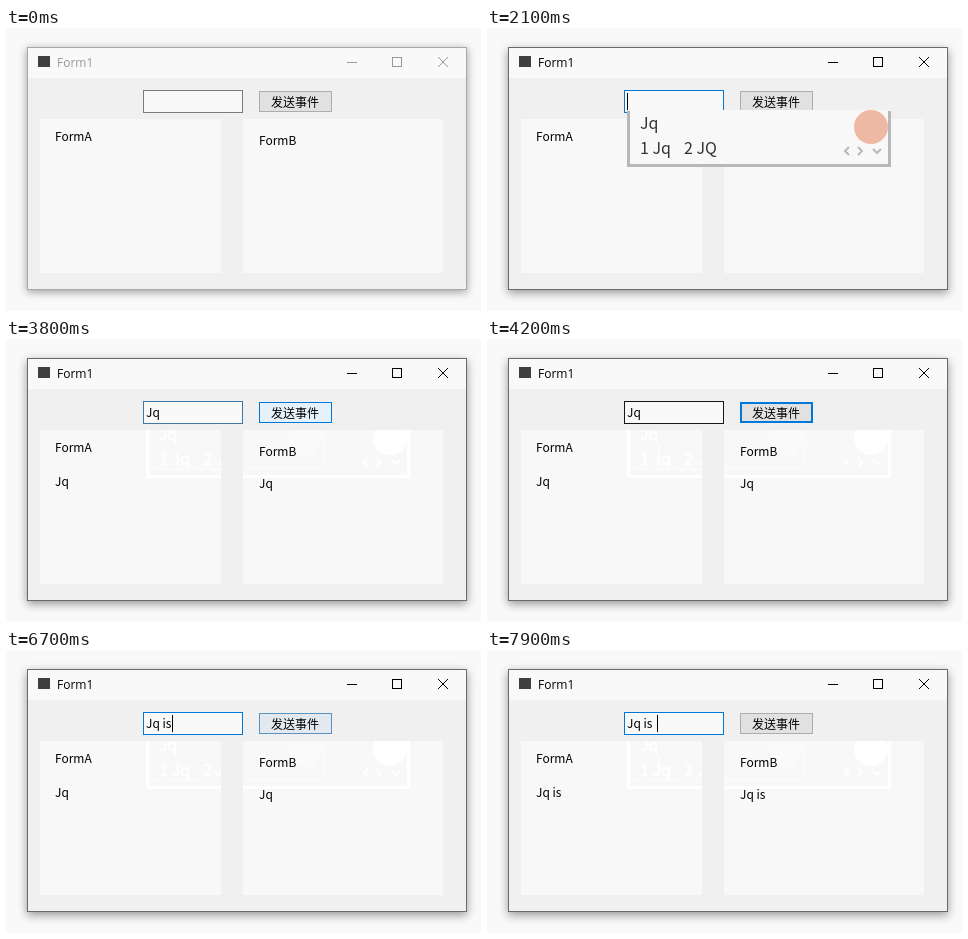
Recreate the animation shown at these times as an HTML page. Size 475 px wide and 283 px high, loop 8000 ms.

```html
<!DOCTYPE html>
<html lang="zh">
<head>
<meta charset="utf-8">
<title>Form1</title>
<style>
  html, body { margin: 0; width: 100%; height: 100%; overflow: hidden; background: #f9f9f9; }
  svg { display: block; width: 475px; height: 283px; font: 12px "Noto Sans CJK SC", "Noto Sans CJK", sans-serif; }
  text { white-space: pre; }
  rect, .crisp { shape-rendering: crispEdges; }
  .title { font-family: "Open Sans", sans-serif; }
  .big { font-size: 16px; }
  #window { filter: drop-shadow(0 2px 4px rgba(0, 0, 0, .38)); }
  #window.active { filter: drop-shadow(0 3px 5px rgba(0, 0, 0, .4)); }
  #popup { fill: #333; stroke: none; }
  #ghost { fill: #fff; stroke: #fff; stroke-width: .5; }
</style>
</head>
<body>
<svg viewBox="0 0 475 283">
  <defs>
    <clipPath id="panels"><path d="M34 91h181v154h-181zM237 91h200v154h-200z"/></clipPath>
  </defs>

  <g id="window">
    <rect id="frame" x="21.5" y="19.5" width="439" height="242" fill="#f9f9f9"/>
  </g>
  <rect x="22" y="50" width="438" height="211" fill="#f0f0f0"/>
  <rect x="32" y="28" width="12" height="11" fill="#3f3f42"/>
  <text id="title" class="title" x="51" y="39">Form1</text>
  <g id="controls" fill="none">
    <path class="crisp" d="M341 34.5h10M386.5 29.5h9v9h-9z"/>
    <path d="M432 29l10 10M442 29l-10 10"/>
  </g>

  <rect x="34" y="91" width="181" height="154" fill="#f8f8f8"/>
  <rect x="237" y="91" width="200" height="154" fill="#f8f8f8"/>
  <g id="ghost" clip-path="url(#panels)"></g>
  <text x="49" y="113">FormA</text>
  <text x="253" y="117">FormB</text>
  <text id="labelA" x="49" y="147"></text>
  <text id="labelB" x="253" y="149"></text>

  <rect id="box" x="137.5" y="62.5" width="99" height="22" fill="#f9f9f9"/>
  <text id="typed" x="140" y="78"></text>
  <rect id="caret" y="65" width="1" height="17"/>
  <rect id="button"/>
  <text x="289" y="78.5" text-anchor="middle">发送事件</text>
  <g id="popup"></g>
</svg>

<script>
const LOOP = 8000;
const $ = id => document.getElementById(id);
const set = (id, attrs) => {
  for (const name in attrs) $(id).setAttribute(name, attrs[name]);
};

// Each track is a list of [start time, value]; a value holds until the next one.
const at = (track, t) => track.findLast(([start]) => start <= t)[1];

const GRAY = '#7a7a7a', DARK = '#171717', BLUE = '#0078d7';
const normal = ['#e1e1e1', '#adadad', 1];
const warm = ['#e3e9ee', '#5793c2', 1];
const hot = ['#e5f1fb', BLUE, 1];
const pressed = ['#cce4f7', '#005499', 1];
const focused = ['#e1e1e1', BLUE, 2];

const boxTrack = [
  [0, GRAY], [700, '#484848'], [800, DARK], [1000, '#0c4877'], [1100, BLUE],
  [3700, '#1878bd'], [3800, '#3d79a8'], [3900, GRAY], [4100, '#484848'], [4200, DARK],
  [4500, '#105081'], [4600, '#0864ac'], [4700, BLUE],
  [7100, '#1878bd'], [7200, '#3d79a8'], [7300, GRAY], [7400, '#484848'], [7500, DARK],
  [7600, '#105081'], [7700, '#0864ac'], [7800, BLUE]
];
const buttonTrack = [
  [0, normal], [3000, hot], [3700, pressed], [3800, hot], [4000, focused], [4500, normal],
  [6700, warm], [6800, hot], [7100, pressed], [7200, hot], [7400, focused], [7600, normal]
];
const typedTrack = [
  [0, ''], [2600, 'Jq'], [4900, 'Jq '], [5600, 'Jq i'], [5800, 'Jq is'], [7900, 'Jq is ']
];
const labelTrack = [[0, ''], [3800, 'Jq'], [7200, 'Jq is']];
const caretTrack = [
  [0, 0], [800, 140], [1600, 0], [2100, 140], [2600, 153], [3400, 0], [4500, 153],
  [4900, 157], [5300, 0], [5600, 160], [5800, 166], [6300, 0], [6700, 166],
  [7100, 0], [7600, 166], [7900, 170]
];

// Candidate window of the input method; its marks remain faintly on the panels.
function candidates(x, right, bottom, word, badge) {
  const row = bottom - 13;
  const arrows = `M${right - 42} ${row - 7}l-4 4 4 4M${right - 33} ${row - 7}l4 4 -4 4M${right - 18} ${row - 5}l4 4 4 -4`;
  const second = word.length > 1 ? `<text class="big" x="197" y="${row}">2 JQ</text>` : '';
  return `<circle cx="${right - 20}" cy="99" r="17" fill="${badge}" stroke="none"/>
    <text class="big" x="153" y="101">${word}</text>
    <text class="big" x="153" y="${row}">1 ${word}</text>${second}
    <path d="${arrows}" fill="none" stroke-width="2"/>
    <path class="crisp" d="M${x + 1} 83V${bottom - 1.5}H${right - 1.5}V83" fill="none" stroke-width="3"/>`;
}
const popup = (x, right, bottom, word) =>
  `<rect x="${x}" y="82" width="${right - x}" height="${bottom - 82}" fill="#f8f8f8"/>
   <g stroke="#b8b8b8" stroke-width="0">${candidates(x, right, bottom, word, '#eeb9a2')}</g>`;
const popupTrack = [
  [0, ''], [1900, popup(141, 319, 131, 'J')], [2100, popup(140, 404, 139, 'Jq')], [2600, '']
];
$('ghost').innerHTML =
  `<g opacity=".35">${candidates(141, 319, 131, 'J', '#fff')}</g>` +
  candidates(140, 404, 139, 'Jq', '#fff');

let shownPopup = '';
function draw(t) {
  const active = t >= 700;
  $('window').classList.toggle('active', active);
  set('frame', { stroke: active ? '#6a6a6a' : '#a8a8a8' });
  set('title', { fill: active ? '#000' : '#999' });
  set('controls', { stroke: active ? '#000' : '#999' });
  set('box', { stroke: at(boxTrack, t) });

  const [fill, stroke, line] = at(buttonTrack, t);
  set('button', {
    x: 253 + line / 2, y: 63 + line / 2, width: 73 - line, height: 21 - line,
    fill, stroke, 'stroke-width': line
  });

  $('typed').textContent = at(typedTrack, t);
  $('labelA').textContent = $('labelB').textContent = at(labelTrack, t);
  const caret = at(caretTrack, t);
  set('caret', { x: caret, visibility: caret ? 'visible' : 'hidden' });

  const nextPopup = at(popupTrack, t);
  if (nextPopup !== shownPopup) $('popup').innerHTML = shownPopup = nextPopup;
  set('ghost', { visibility: t >= 2600 ? 'visible' : 'hidden' });
}

function tick() {
  draw(performance.now() % LOOP);
  requestAnimationFrame(tick);
}
tick();
</script>
</body>
</html>
```
